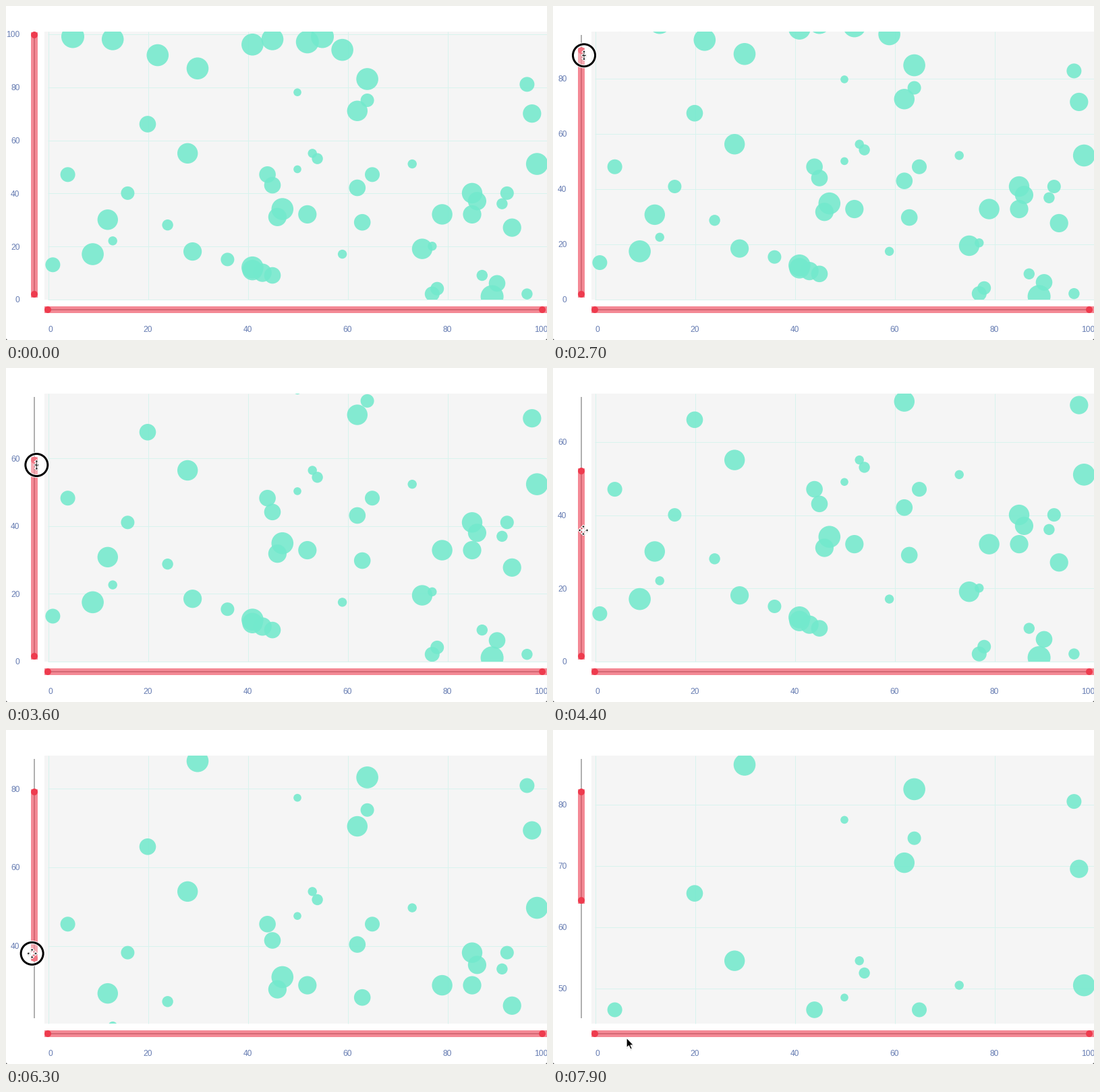
Recreate the animation shown at these times as a matplotlib script. Size 802 by 496 pixels, loop 8000 ms.

```python
import numpy as np
import matplotlib.pyplot as plt
from matplotlib.animation import FuncAnimation
from matplotlib.patches import Circle, Polygon, Rectangle

W, H, DPI = 802, 496, 64
PX = 72 / DPI
FRAMES, STEP = 80, 100

LEFT, TOP, BOTTOM = 62, 42, 436
PLOT_X, PLOT_Y = 57, 37.5
MINT = (115 / 255, 233 / 255, 205 / 255)
RED = "#ee3b4e"
LABEL = "#667cb2"
GRID = "#d8f3ee"

# Bubble radius in pixels: (x, y) values
BUBBLES = {
    17: [(5, 99), (52, 97), (55, 99), (89, 1)],
    16.3: [(13, 98), (22, 92), (30, 87), (41, 96), (45, 98), (59, 94),
           (64, 83), (9, 17), (41, 12), (47, 34), (98, 51)],
    15.2: [(62, 71), (28, 55), (12, 30), (41, 11), (75, 19), (79, 32), (85, 40)],
    13.6: [(29, 18), (43, 10), (46, 31), (52, 32), (86, 37), (85, 32),
           (93, 27), (97, 70)],
    12.3: [(20, 66), (45, 9), (44, 47), (45, 43), (62, 42), (63, 29), (90, 6)],
    11: [(4, 47), (1, 13), (65, 47), (96, 81), (77, 2)],
    10: [(64, 75), (16, 40), (36, 15), (92, 40), (78, 4)],
    8.2: [(24, 28), (54, 53), (91, 36), (87, 9), (96, 2)],
    6.7: [(13, 22), (53, 55), (59, 17), (73, 51), (77, 20)],
    5.8: [(50, 78), (50, 49)],
}

# time, top handle, bottom handle, lowest and highest visible value
VIEW = np.array([
    (2400, 43, 428, 0, 100),
    (3200, 104.5, 428, 0, 84.3),
    (3800, 153, 428, 0, 72.5),
    (4500, 153, 428, 0, 72.5),
    (4900, 92, 367, 15.4, 87.7),
    (6000, 92, 367, 15.4, 87.7),
    (6800, 92, 292, 34.8, 87.9),
    (7300, 92, 253, 44.8, 88.1),
])

# time, pointer x, pointer y
POINTER = np.array([
    (300, 802, 468), (1200, 43, 47), (1800, 43, 47), (2000, 45, 50),
    (2400, 46, 50), (3200, 46, 112), (3800, 45, 160), (4300, 45, 241),
    (4500, 45, 241), (4900, 41, 180), (5200, 41, 180), (5800, 39, 360),
    (6000, 39, 360), (6800, 38, 285), (7300, 38, 246), (7800, 109, 457),
])
PRESSES = [(1900, 3800), (4500, 5200), (5900, 7300)]

ARROW = [(0, 0), (0, 15), (3.4, 11.8), (5.9, 17.2), (8.4, 16.1),
         (6, 11), (10.6, 11)]
SPOKE = [(1, -1), (1, -4.5), (3.3, -4.5), (0, -7.8), (-3.3, -4.5), (-1, -4.5)]


def track(table, t):
    return [np.interp(t, table[:, 0], column) for column in table.T[1:]]


def turn(points, quarters):
    for _ in range(quarters):
        points = [(y, -x) for x, y in points]
    return points


MOVE = [p for q in range(4) for p in turn(SPOKE, q)[::-1]]
RESIZE = SPOKE + [(-1, -1.2), (-3.5, -1.2), (-3.5, 1.2), (-1, 1.2)]
RESIZE += turn(SPOKE, 2)[::-1][:0] + [(-1, 4.5), (-3.3, 4.5), (0, 7.8),
                                      (3.3, 4.5), (1, 4.5), (1, 1.2),
                                      (3.5, 1.2), (3.5, -1.2), (1, -1.2)]


def to_y(value, low, high):
    return BOTTOM - (value - low) * (BOTTOM - TOP) / (high - low)


def to_x(value):
    return LEFT + 7.4 * value


fig = plt.figure(figsize=(W / DPI, H / DPI), dpi=DPI, facecolor="white")
ax = fig.add_axes([0, 0, 1, 1])
ax.set_xlim(0, W)
ax.set_ylim(H, 0)
ax.axis("off")


def add(patch):
    return ax.add_patch(patch)


def line(xs, ys, color, width, z):
    return ax.plot(xs, ys, color=color, lw=width * PX, zorder=z,
                   solid_capstyle="butt")[0]


def text(x, y, value, align):
    return ax.text(x, y, str(value), color=LABEL, fontsize=12 * PX, ha=align,
                   va="center_baseline", family="Liberation Sans")


def handle(x, y):
    return add(Circle((x, y), 5, fc=RED, lw=0, zorder=6))


def bar(x, y, width, height):
    return add(Rectangle((x, y), width, height, fc=RED, alpha=0.6, lw=0, zorder=5))


plot = add(Rectangle((PLOT_X, PLOT_Y), W - PLOT_X, BOTTOM - PLOT_Y,
                     fc="#f5f5f5", lw=0, zorder=0))
for value in range(0, 101, 20):
    x = to_x(value)
    line([x + 0.5, x + 0.5], [PLOT_Y, BOTTOM], GRID, 1, 1)
    text(min(max(x, 66), 793), 479, value, "center")

line([42, 42], [43, 428], "#969696", 1.5, 4)
line([62, 795], [451, 451], "#969696", 1.5, 4)
bar(57, 446, W - 57, 10)
handle(62, 451)
handle(795, 451)
for x, side in ((0, 1), (W, -1)):
    add(Polygon([(x, H), (x + 2 * side, H), (x, H - 2)], fc="#555555", lw=0))

range_bar = bar(37, 38, 10, 394)
top_handle, bottom_handle = handle(42, 43), handle(42, 428)

circles = []
for radius, points in BUBBLES.items():
    for x, value in points:
        circle = add(Circle((to_x(x), 0), radius, fc=MINT, alpha=0.88, lw=0, zorder=3))
        circle.set_clip_path(plot)
        circles.append((circle, value))

passing = []


def draw_axis(low, high):
    step = 20 if high - low > 60 else 10
    for value in range(0, 101, step):
        y = to_y(value, low, high)
        if PLOT_Y <= y <= BOTTOM + 0.5:
            passing.append(line([LEFT, W], [y, y], GRID, 1, 1))
            passing.append(text(20.5, y, value, "right"))


def draw_shape(shape, x, y):
    for dy, style in ((1.5, dict(fc="black", alpha=0.18, lw=0)),
                      (0, dict(fc="black", ec="white", lw=1.2 * PX))):
        points = [(x + px, y + py + dy) for px, py in shape]
        passing.append(add(Polygon(points, zorder=9, joinstyle="round", **style)))


def draw_pointer(t):
    if t < POINTER[0, 0]:
        return
    x, y = track(POINTER, t)
    for start, end in PRESSES:
        if start <= t < end:
            radius = 16.5 + 13 * max(0, 1 - (t - start) / 300)
            passing.append(add(Circle((x, y), radius, fc=(1, 1, 1, 0.3),
                                      ec="white", lw=5 * PX, zorder=7)))
            passing.append(add(Circle((x, y), radius, fc="none", ec="black",
                                      lw=3 * PX, zorder=8)))
    if t < 1800 or t >= 7400:
        shape = ARROW
    elif t < 4000:
        shape = RESIZE
    else:
        shape = MOVE
    draw_shape(shape, x, y)


def update(frame):
    t = frame * STEP
    while passing:
        passing.pop().remove()

    top, bottom, low, high = track(VIEW, t)
    range_bar.set_y(top - 4.5)
    range_bar.set_height(bottom - top + 9)
    top_handle.center = 42, top
    bottom_handle.center = 42, bottom
    for circle, value in circles:
        circle.center = circle.center[0], to_y(value, low, high) - 0.5

    # The axis trails the bubbles by one step
    *_, low, high = track(VIEW, t - STEP)
    drift = np.interp(t, [6800, 7300], [0, -0.55])
    draw_axis(low + drift, high + drift)
    draw_pointer(t)
    return []


anim = FuncAnimation(fig, update, frames=FRAMES, interval=STEP,
                     init_func=lambda: [], repeat=True, repeat_delay=0)
plt.show()
```
